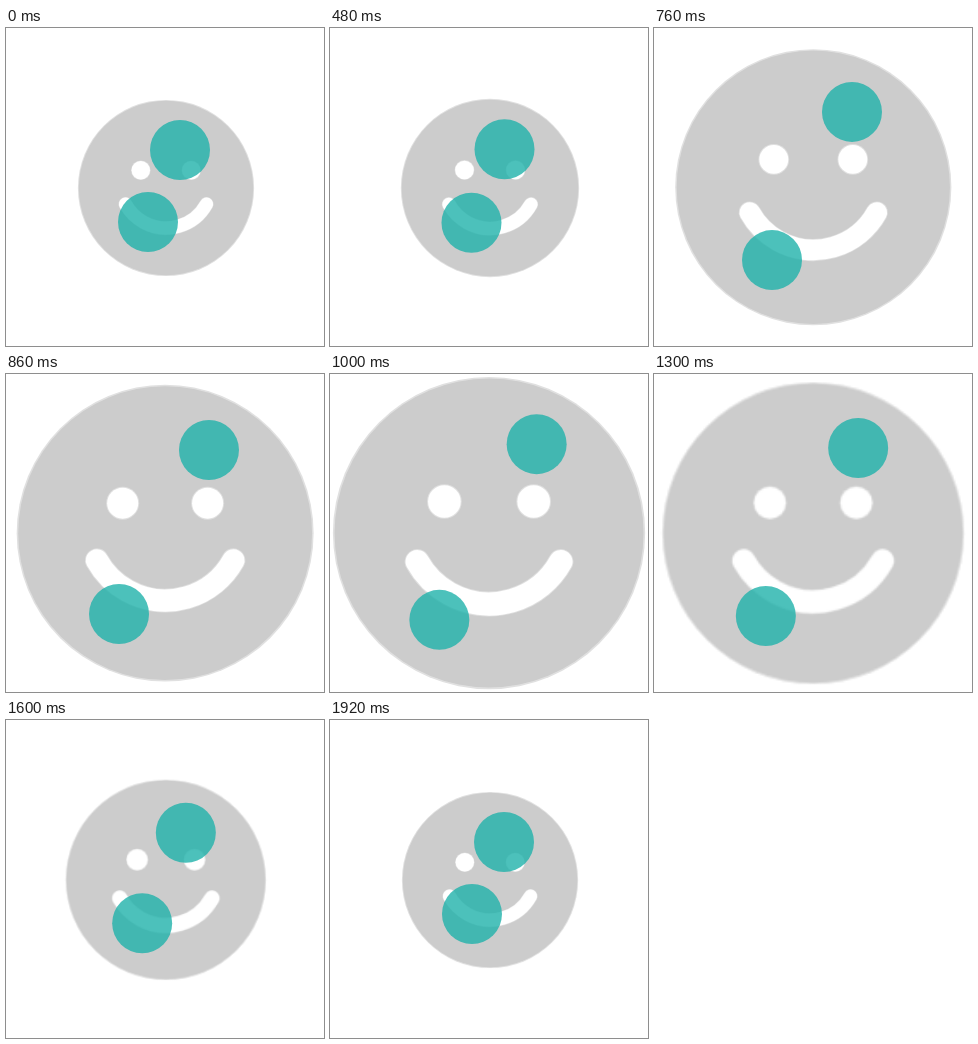
Recreate the animation shown at these times as an HTML page with a canvas. Size 318x318 px, loop 2080 ms.

```html
<!DOCTYPE html>
<html lang="en">
<head>
<meta charset="utf-8">
<title>Pinch zoom</title>
<style>
  html, body { margin: 0; width: 100%; height: 100%; overflow: hidden; background: #fff; }
  canvas { display: block; width: 100vw; height: 100vh; }
</style>
</head>
<body>
<canvas id="stage" width="318" height="318"></canvas>
<script>
const SIZE = 318, LOOP = 2080, STEP = 20;
const GROW = 460, SHRINK = 1220, SPAN = 720;
const ctx = document.getElementById('stage').getContext('2d');

// cubic-bezier(.25, .1, .25, 1)
function ease(x) {
  if (x <= 0) return 0;
  if (x >= 1) return 1;
  const curve = (a, b, u) => 3 * a * u * (1 - u) ** 2 + 3 * b * u * u * (1 - u) + u ** 3;
  let lo = 0, hi = 1;
  for (let i = 0; i < 24; i++) {
    const mid = (lo + hi) / 2;
    if (curve(0.25, 0.25, mid) < x) lo = mid; else hi = mid;
  }
  return curve(0.1, 1, lo);
}

function disc(c, x, y, r, fill) {
  c.beginPath();
  c.arc(x, y, r, 0, Math.PI * 2);
  c.fillStyle = fill;
  c.fill();
}

function smile(c, width, color) {
  const half = 61 * Math.PI / 180;
  c.beginPath();
  c.arc(0, -6.3, 46.3, Math.PI / 2 - half, Math.PI / 2 + half);
  c.lineCap = 'round';
  c.lineWidth = width;
  c.strokeStyle = color;
  c.stroke();
}

function face(c) {
  const rim = '#e0e0e0';
  disc(c, 0, 0, 88.1, rim);
  disc(c, 0, 0, 87.2, '#ccc');
  for (const x of [-25.2, 25.2]) {
    disc(c, x, -17.8, 9.8, rim);
    disc(c, x, -17.8, 9.2, '#fff');
  }
  smile(c, 14.2, rim);
  smile(c, 13.2, '#fff');
}

// Bitmap of the face at rest, enlarged while zooming out
const BOX = 180;
const bitmap = document.createElement('canvas');
bitmap.width = bitmap.height = BOX;
const bctx = bitmap.getContext('2d');
bctx.translate(BOX / 2, BOX / 2);
face(bctx);

function draw(t) {
  const shrinking = t >= SHRINK;
  const p = shrinking ? 1 - ease((t - SHRINK) / SPAN) : ease((t - GROW) / SPAN);
  const scale = 1 + 0.804 * p;

  ctx.fillStyle = '#fff';
  ctx.fillRect(0, 0, SIZE, SIZE);

  ctx.save();
  ctx.translate(160 - p, 160 - p);
  ctx.scale(scale, scale);
  if (shrinking) ctx.drawImage(bitmap, -BOX / 2, -BOX / 2);
  else face(ctx);
  ctx.restore();

  const touch = 'rgba(32, 178, 170, 0.8)';
  disc(ctx, 174 + 34 * p, 122 - 54 * p, 30, touch);
  disc(ctx, 142 - 34 * p, 194 + 54 * p, 30, touch);
}

const start = performance.now();
function tick() {
  const t = (performance.now() - start) % LOOP;
  draw(Math.floor(t / STEP) * STEP);
  requestAnimationFrame(tick);
}
tick();
</script>
</body>
</html>
```
